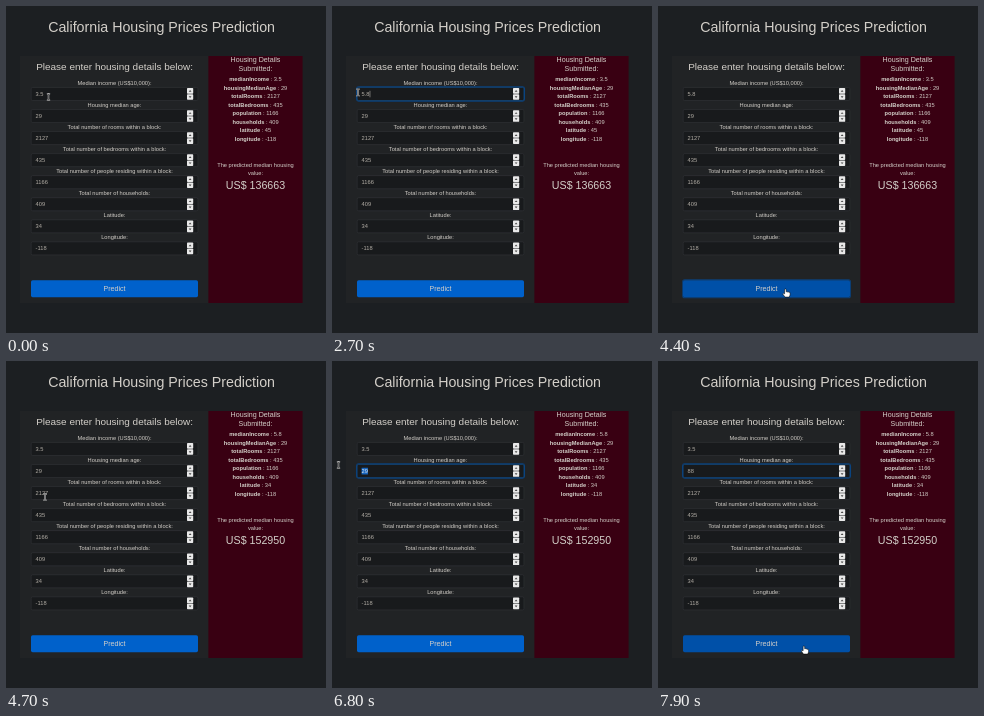
Animation of 320x327 px, one loop 8000 ms. Source, as an HTML page:

```html
<!DOCTYPE html>
<html lang="en">
<head>
<meta charset="utf-8">
<title>Housing form</title>
<style>
html, body { margin: 0; width: 100%; height: 100%; overflow: hidden; background: #1c1f22; }
svg { display: block; width: 100%; height: 100%; }
text { font-family: "Liberation Sans", Arial, sans-serif; fill: #d3cfc9; white-space: pre; }
</style>
</head>
<body>
<svg id="stage" viewBox="0 0 320 327"></svg>
<script>
const stage = document.getElementById("stage");
const LOOP = 8000, STEP = 100;
const BODY = 5.7, PITCH = 22.06, TOP = 81.2;

const fields = [
  ["Median income (US$10,000):", "3.5"],
  ["Housing median age:", "29"],
  ["Total number of rooms within a block:", "2127"],
  ["Total number of bedrooms within a block:", "435"],
  ["Total number of people residing within a block:", "1166"],
  ["Total number of households:", "409"],
  ["Latitude:", "34"],
  ["Longitude:", "-118"]
];
const keys = ["medianIncome", "housingMedianAge", "totalRooms", "totalBedrooms",
  "population", "households", "latitude", "longitude"];

// Pointer path: time, x, y
const path = [
  [0, 42.5, 91], [100, 42.5, 91], [500, 47, 87.5], [1000, 47, 87.5], [1400, 26, 86.5],
  [3000, 26, 86.5], [3600, 131.5, 282], [3800, 128.5, 287], [4400, 128.5, 287],
  [4700, 39, 136], [5000, 41, 110], [5200, 41, 110], [5600, 6.5, 104],
  [7400, 6.5, 104], [7800, 147, 289], [8000, 147, 289]
];

const between = (t, a, b) => t >= a && t < b;

const rect = (x, y, w, h, fill, extra = "") =>
  `<rect x="${x}" y="${y}" width="${w}" height="${h}" fill="${fill}" ${extra}/>`;

const text = (x, y, size, str, extra = 'text-anchor="middle"') =>
  `<text x="${x}" y="${y}" font-size="${size}" ${extra}>${str}</text>`;

function pointerAt(t) {
  const i = path.findIndex((p, n) => n && t <= p[0]);
  const [t0, x0, y0] = path[i - 1], [t1, x1, y1] = path[i];
  const u = (t - t0) / (t1 - t0), e = u * u * (3 - 2 * u);
  return [x0 + (x1 - x0) * e, y0 + (y1 - y0) * e];
}

function valueAt(i, t) {
  if (i === 0 && between(t, 2400, 4600)) return "5.8".slice(0, 1 + Math.floor((t - 2400) / 100));
  if (i === 1 && t >= 7000) return t < 7200 ? "8" : "88";
  return fields[i][1];
}

const textWidth = s => [...s].reduce((w, c) => w + (c === "." ? 0.278 : 0.556), 0) * BODY;

function spinner(y) {
  return rect(181, y + 0.9, 6.2, 5.6, "#e9e9e9", 'rx=".7"') +
    rect(181, y + 7, 6.2, 5.6, "#e9e9e9", 'rx=".7"') +
    `<path d="M182.7 ${y + 4.6}h2.8l-1.4-1.7zM182.7 ${y + 9}h2.8l-1.4 1.7z" fill="#444"/>`;
}

function field(i, t) {
  const y = TOP + PITCH * i, value = valueAt(i, t), base = y + 8.75;
  const focused = i === 0 ? between(t, 1000, 4300) : i === 1 && t >= 5200;
  const end = 29.6 + textWidth(value);
  let out = text(108.5, y - 2.4, BODY, fields[i][0]);
  if (focused) out += rect(24.6, y - 0.5, 167.9, 14.5, "none", 'rx="1.9" stroke="#0b3f78" stroke-width="1.1"');
  out += rect(25.2, y + 0.2, 166.7, 13.1, "#181a1c",
    `rx="1.4" stroke="${focused ? "#0d5ca9" : "#36393d"}" stroke-width=".5"`);

  const start = i === 0 ? 1100 : 5300, stop = i === 0 ? 2400 : 7000;
  const selected = focused && between(t, start, stop);
  if (selected) {
    const left = Math.max(29.6, Math.min(end, pointerAt(t)[0]));
    out += rect(left, y + 3.5, end - left, 6.7, "#1766c0");
  }
  out += text(29.6, base, BODY, value, `style="fill:${selected ? "#e4e8ec" : "#b5b0a8"}"`);

  const typed = i === 0 ? 2600 : 7200;
  if (focused && t >= stop && (t < typed || (t - typed) % 1000 < 500))
    out += rect(end + 0.2, y + 3.6, 0.5, 6.5, "#d3cfc9");
  return out + spinner(y);
}

function results(t) {
  const done = t >= 4600;
  const values = fields.map(f => f[1]);
  if (done) values[0] = "5.8"; else values[6] = "45";
  return rect(202.4, 50, 94.2, 247, "#390012") +
    text(249.5, 56.3, 7.12, "Housing Details") +
    text(249.5, 64.7, 7.12, "Submitted:") +
    keys.map((k, i) => text(249.5, 75.3 + 8.52 * i, BODY,
      `<tspan font-weight="bold">${k}</tspan> : ${values[i]}`)).join("") +
    text(249.5, 160.7, BODY, "The predicted median housing") +
    text(249.5, 169.2, BODY, "value:") +
    text(249.5, 183.3, 10.68, "US$ " + (done ? 152950 : 136663));
}

function button(t) {
  const hover = between(t, 3700, 4500) || t >= 7700;
  const ring = between(t, 4300, 4500)
    ? rect(24.7, 273.7, 167.7, 18, "none", 'rx="2" stroke="#0b3f78" stroke-width="1.1"') : "";
  return ring + rect(25, 274.2, 167, 17.1, hover ? "#0050a8" : "#0061cb", 'rx="1.7"') +
    text(108.5, 285.3, 7.12, "Predict");
}

function pointer(t) {
  const [x, y] = pointerAt(t);
  if (y > 276) return `<path transform="translate(${x} ${y})"
    d="M-1.9 .8V-3.6q.8-1 1.6 0V-1.2q.9-.5 1.4.2q.8-.4 1.3.3q1-.3 1.2.7V2L2.7 4.1H-1.5L-3.8 .9q.4-1 1.9-.1z"
    fill="#fff" stroke="#000" stroke-width=".55"/>`;
  const beam = (color, width) => `<path transform="translate(${x} ${y})"
    d="M-1.6-3.2Q-.2-3.2 0-2.6Q.2-3.2 1.6-3.2M0-2.6V2.6M-1.6 3.2Q-.2 3.2 0 2.6Q.2 3.2 1.6 3.2"
    fill="none" stroke="${color}" stroke-width="${width}"/>`;
  return beam("#e8e8e8", 1.4) + beam("#000", 0.55);
}

function draw(t) {
  stage.innerHTML =
    text(155.6, 25.5, 14.23, "California Housing Prices Prediction") +
    rect(14, 50, 282.6, 247, "#212325") +
    text(108.6, 64.1, 9.97, "Please enter housing details below:") +
    fields.map((f, i) => field(i, t)).join("") +
    button(t) + results(t) + pointer(t);
}

let last = -1;
function tick(now) {
  const t = Math.floor((now % LOOP) / STEP) * STEP;
  if (t !== last) draw(last = t);
  requestAnimationFrame(tick);
}
draw(0);
requestAnimationFrame(tick);
</script>
</body>
</html>
```
